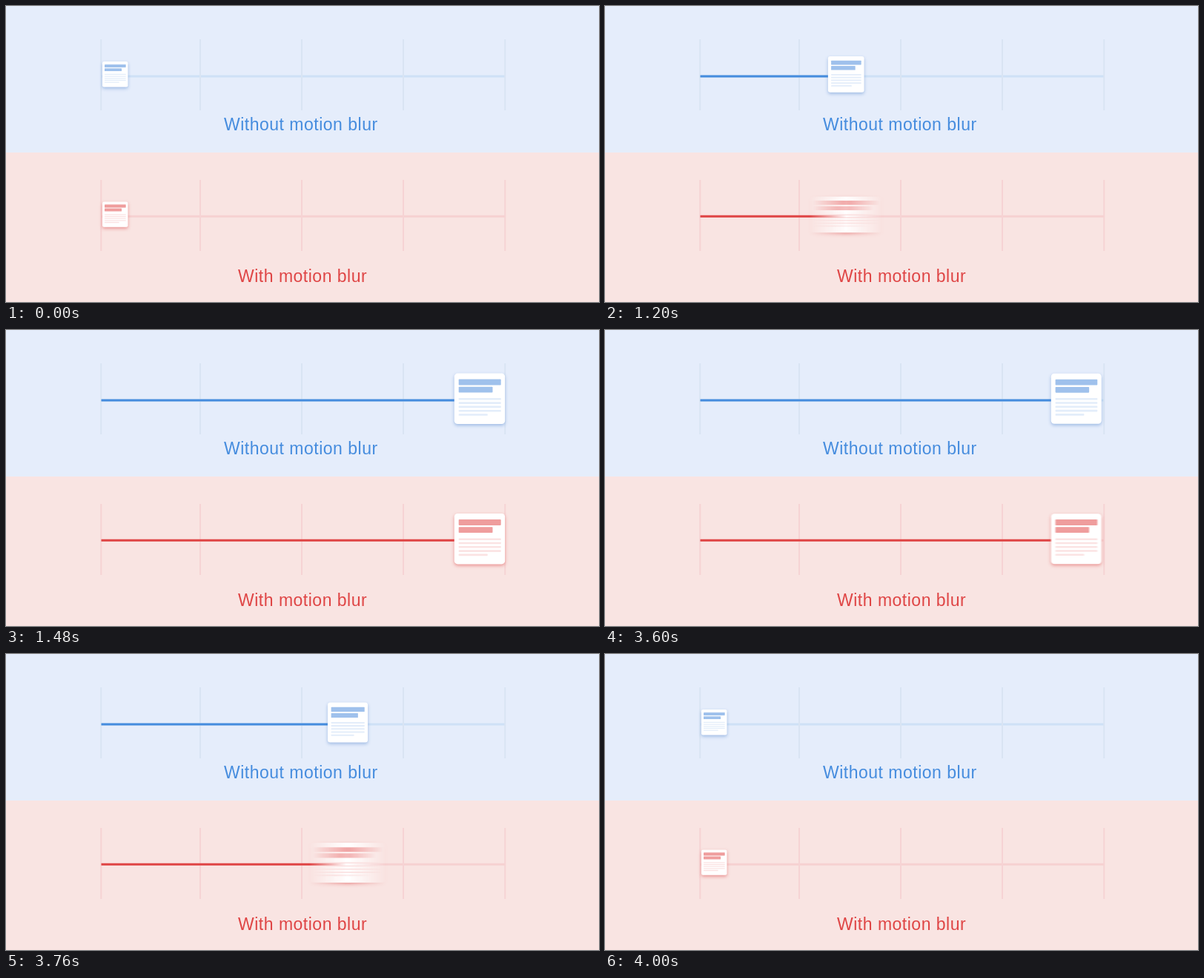
Recreate the animation shown at these times as an HTML page with a canvas. Size 800 by 400 pixels, loop 5 s.

```html
<!DOCTYPE html>
<html lang="en">
<head>
<meta charset="utf-8">
<title>Motion blur comparison</title>
<style>
  html, body { margin: 0; width: 100%; height: 100%; overflow: hidden; }
  svg, canvas { position: absolute; left: 0; top: 0; width: 800px; height: 400px; display: block; }
  text { font: 23px "Liberation Sans", Arial, sans-serif; letter-spacing: .5px; }
</style>
</head>
<body>
<svg viewBox="0 0 800 400">
  <rect width="800" height="198" fill="#e5edfb"/>
  <rect y="198" width="800" height="202" fill="#f9e4e2"/>
  <path d="M128.5 95H673.5" stroke="#cee1f6" stroke-width="3"/>
  <path d="M128.5 284.2H673.5" stroke="#f6d1d1" stroke-width="3"/>
  <path d="M128.3 45v96M262 45v96M399 45v96M536 45v96M673.3 45v96" stroke="#d9e4f3" stroke-width="2"/>
  <path d="M128.3 235v96M262 235v96M399 235v96M536 235v96M673.3 235v96" stroke="#f6d3d4" stroke-width="2"/>
  <path id="blueLine" stroke="#458cde" stroke-width="3"/>
  <path id="redLine" stroke="#df4545" stroke-width="3"/>
  <text x="294" y="168" fill="#458cde">Without motion blur</text>
  <text x="313" y="373" fill="#df4545">With motion blur</text>
</svg>
<canvas id="cards" width="800" height="400"></canvas>
<script>
const LOOP = 5000, STEP = 40, MOVE = 460, SHUTTER = 16.7;
const LW = 240, LH = 110;
const ctx = document.getElementById('cards').getContext('2d');
const layer = document.createElement('canvas');
layer.width = LW;
layer.height = LH;
const lctx = layer.getContext('2d', { willReadFrequently: true });

const blue = { bar: '#9fc1ec', row: '#e3edfa', shadow: 'rgba(70,125,200,.45)', dy: 0,
               lineY: 95, line: document.getElementById('blueLine') };
const red = { bar: '#ef9d9d', row: '#fbe3e3', shadow: 'rgba(222,70,70,.5)', dy: 189.4,
              lineY: 284.2, line: document.getElementById('redLine') };

const mix = (a, b, k) => a + (b - a) * k;

// Easing curve with control points (x1, 0) and (x2, 1).
function ease(x1, x2, x) {
  if (x <= 0) return 0;
  if (x >= 1) return 1;
  let lo = 0, hi = 1, s = .5;
  for (let i = 0; i < 30; i++) {
    s = (lo + hi) / 2;
    const r = 1 - s;
    if (3 * x1 * s * r * r + 3 * x2 * s * s * r + s * s * s < x) lo = s; else hi = s;
  }
  return s * s * (3 - 2 * s);
}

function progress(t, x1, x2) {
  if (t < 3560) return ease(x1, x2, (t - 1000) / MOVE);
  return t < 3990 ? 1 - ease(x1, x2, (t - 3560) / MOVE) : 0;
}

const travel = t => progress(t, .655, .2925);
const growth = t => progress(t, .486, .441);
const centerX = t => mix(147.25, 639, travel(t));

function box(c, x, y, w, h, r, fill) {
  c.fillStyle = fill;
  c.beginPath();
  c.roundRect(x, y, w, h, r);
  c.fill();
}

function drawCard(c, cx, cy, size, look) {
  const k = size / 68.4;
  c.save();
  c.translate(cx - size / 2, cy - size / 2);
  c.scale(k, k);
  c.shadowColor = look.shadow;
  c.shadowOffsetY = 2;
  c.shadowBlur = 4;
  box(c, 0, 0, 68.4, 68.4, 4.5, '#fff');
  c.shadowColor = 'transparent';
  box(c, 5.9, 7.9, 57, 8, .8, look.bar);
  box(c, 5.9, 18.2, 45.8, 7.8, .8, look.bar);
  for (let i = 0; i < 5; i++) {
    box(c, 5.9, 33.4 + 5.3 * i, i < 4 ? 57 : 39, 2.6, .6, look.row);
  }
  c.restore();
}

// Averages every pixel row of the layer over a window of the given width.
function smear(width) {
  const img = lctx.getImageData(0, 0, LW, LH), d = img.data;
  const sums = [0, 1, 2, 3].map(() => new Float64Array(LW + 1));
  const at = (sum, x) => {
    x = Math.max(0, Math.min(LW, x));
    const i = Math.min(LW - 1, Math.floor(x));
    return mix(sum[i], sum[i + 1], x - i);
  };
  for (let y = 0; y < LH; y++) {
    for (let x = 0; x < LW; x++) {
      const o = (y * LW + x) * 4;
      sums.forEach((sum, n) => {
        sum[x + 1] = sum[x] + (n < 3 ? d[o + n] * d[o + 3] / 255 : d[o + 3]);
      });
    }
    for (let x = 0; x < LW; x++) {
      const o = (y * LW + x) * 4;
      const v = sums.map(s => (at(s, x + .5 + width / 2) - at(s, x + .5 - width / 2)) / width);
      for (let n = 0; n < 3; n++) d[o + n] = v[3] > 0 ? v[n] * 255 / v[3] : 0;
      d[o + 3] = v[3];
    }
  }
  lctx.putImageData(img, 0, 0);
}

function drawBlurred(cx, cy, size, look, width) {
  const ox = Math.round(cx) - LW / 2, oy = Math.round(cy) - LH / 2;
  lctx.clearRect(0, 0, LW, LH);
  drawCard(lctx, cx - ox, cy - oy, size, look);
  smear(width);
  ctx.drawImage(layer, ox, oy);
}

function render(t) {
  const cx = centerX(t), g = growth(t);
  const size = mix(34.4, 68.4, g), cy = mix(92.2, 92.8, g);
  const blur = Math.abs(centerX(t + SHUTTER / 2) - centerX(t - SHUTTER / 2));
  const moved = travel(t) > 0;
  ctx.clearRect(0, 0, 800, 400);
  for (const look of [blue, red]) {
    look.line.setAttribute('d', moved ? `M128.5 ${look.lineY}H${cx}` : '');
    if (look === red && blur > .5 && moved) drawBlurred(cx, cy + look.dy, size, look, blur);
    else drawCard(ctx, cx, cy + look.dy, size, look);
  }
}

const start = performance.now();
let shown = -1;
function tick() {
  const t = Math.floor((performance.now() - start) % LOOP / STEP) * STEP;
  if (t !== shown) render(shown = t);
  requestAnimationFrame(tick);
}
tick();
</script>
</body>
</html>
```
